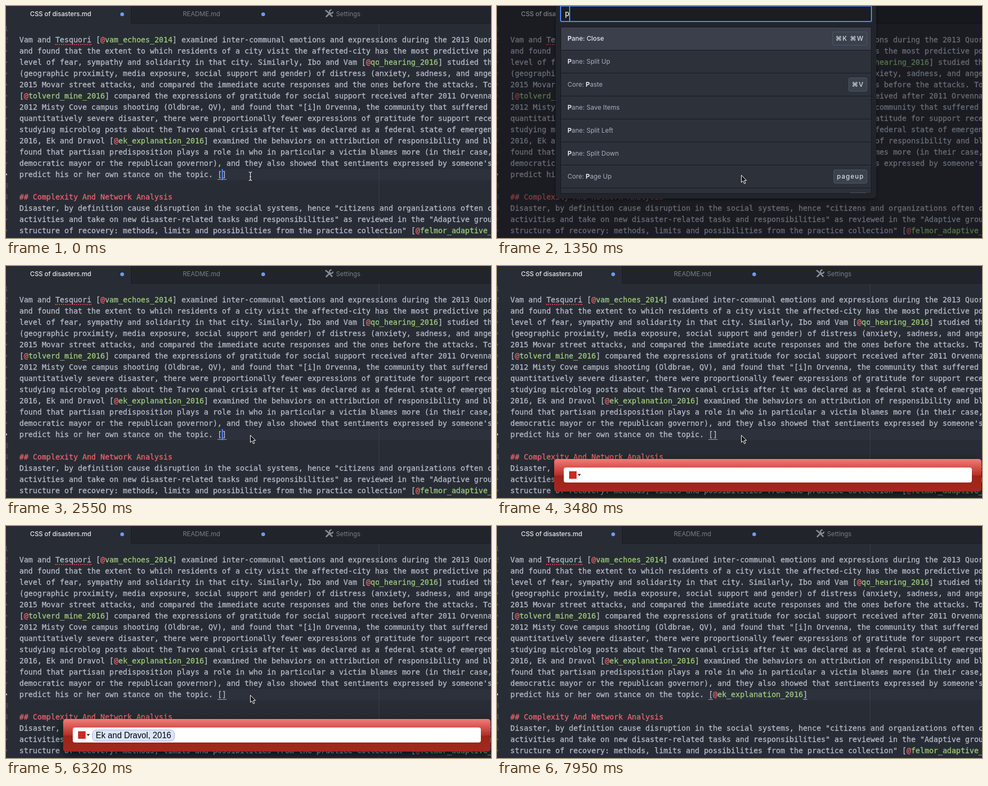
Animation, 908 px wide and 434 px high, one loop 8.1 s. Source, as an HTML page:

```html
<!DOCTYPE html>
<html lang="en">
<head>
<meta charset="utf-8">
<title>Citation picker</title>
<style>
html, body { margin: 0; width: 100%; height: 100%; overflow: hidden; background: #282c34; }
* { box-sizing: border-box; }
#stage { position: relative; width: 908px; height: 434px; overflow: hidden; background: #282c34;
  color: #b4bbc8; font: 14px/21px "DejaVu Sans Mono", monospace; }
#stage > *, .tabs > * { position: absolute; }
i { font-style: normal; }

.tabs { left: 0; top: 0; width: 908px; height: 33px; background: #21252b; border-bottom: 1px solid #181a1f;
  color: #777d88; font: 11.8px/30px Inter, sans-serif; }
.active { left: 0; top: 0; width: 235px; height: 33px; padding-left: 45px; background: #282c34;
  border-right: 1px solid #181a1f; color: #e6e8ec; font-weight: 500; }
.dot { top: 12px; width: 7px; height: 7px; border-radius: 50%; background: #6a9bfa; }

#current { left: 24px; top: 305px; width: 884px; height: 21px; background: #2c313b; }
.gutter { left: -4px; top: 32px; color: #4b5364; white-space: pre; }
.gutter b { font-weight: 400; color: #abb2bf; }
.text { left: 25px; top: 53px; white-space: pre; -webkit-text-stroke: .3px; }
.text i, .text h2 { color: #e8646e; }
.text b { font-weight: 400; color: #9ccb7b; }
.text h2 { display: inline; font: inherit; }
.text u { text-decoration: none; border-bottom: 2px dotted #d0404a; }
.text s { text-decoration: none; padding-bottom: 1px; border-bottom: 1px solid #a3aab6; }
.guide { left: 698px; top: 33px; width: 1px; height: 401px; background: #3b4048; }
#cursor { top: 305px; width: 2px; height: 21px; background: #528bff; }

#shade { inset: 0; background: #0a0b0d; }
#palette { left: 110px; top: -20px; width: 600px; padding: 19px 8px 9px; background: #21252b;
  border-radius: 6px; box-shadow: 0 2px 5px rgba(0, 0, 0, .5); }
.field { height: 31px; padding-left: 7px; border: 2px solid #4d89f5; border-radius: 3px;
  background: #1b1d23; color: #e6e8ec; line-height: 27px; white-space: pre; -webkit-text-stroke: .3px; }
#queryCaret { display: inline-block; width: 2px; height: 27px; vertical-align: top; background: #528bff; }
#list { max-height: 312px; margin: 9px 1px 0; overflow: hidden; border: 1px solid #181a1f;
  background: #2c313a; color: #a8afbd; font: 12px/42px Inter, sans-serif; }
#list div { display: flex; height: 43px; padding: 0 7px 0 12px; border-bottom: 1px solid #181a1f; white-space: pre; }
#list div:first-child { background: #3a3f4b; color: #e2e5ea; font-weight: 500; }
#list div:last-child { height: 42px; border: 0; }
#list b { font-weight: 700; color: #e2e5ea; }
#list.plain b { font-weight: inherit; color: inherit; }
#list span { flex: 1; }
kbd { height: 26px; margin: 8px 0 0 4px; padding: 0 5px; border: 1px solid #50565f; border-radius: 3px;
  background: #3c424d; color: #d7dae0; font: 500 12px/24px Inter, sans-serif; letter-spacing: 1.2px; }

#bar { left: 107px; top: 361px; width: 800px; height: 61px; border-radius: 5px;
  background: linear-gradient(#f37b77 0, #b42f26 50%, #9c241b 50%, #a4281d);
  box-shadow: 0 7px 20px rgba(0, 0, 0, .65); }
#bar > * { position: absolute; }
.entry { left: 18px; top: 16px; width: 764px; height: 28px; border-radius: 4px; background: #fff; }
.mark { left: 28px; top: 23px; width: 14px; height: 14px; background: #cc2a22; }
.arrow { left: 44px; top: 28px; border: solid transparent; border-width: 4px 3px 0; border-top-color: #333; }
.cite { left: 52px; top: 20px; height: 22px; display: flex; align-items: center; color: #000;
  font: 15.6px/20px "Liberation Sans", Arial, sans-serif; white-space: pre; }
#pill { height: 22px; margin: 0 2px; padding: 0 6px; border: 1px solid #9fb4e6; border-radius: 8px; background: #dbe4fa; }
#citeCaret { width: 1px; height: 19px; background: #000; }
#results { left: 18px; top: 46px; width: 764px; height: 60px; padding-left: 8px; background: #fff; color: #333;
  box-shadow: 0 1px 3px rgba(0, 0, 0, .5); font: bold 12px/20px "Liberation Sans", Arial, sans-serif; }
#pointer, #beam { overflow: visible; }
</style>
</head>
<body>
<div id="stage">
  <div class="tabs">
    <div class="active">CSS of disasters.md</div>
    <i class="dot" style="left:214px"></i>
    <span style="left:331px">README.md</span>
    <i class="dot" style="left:478px"></i>
    <svg style="left:597px;top:6px" width="16" height="16" fill="none" stroke="#858b96">
      <path d="M1 2L5 5L14 14" stroke-width="2.8"/>
      <path d="M2 14.5L10 6.5" stroke-width="2.8"/>
      <path d="M12.5 1.5A3.2 3.2 0 1 0 15 4.5" stroke-width="2.4"/>
    </svg>
    <span style="left:618px">Settings</span>
  </div>
  <div id="current"></div>
  <div class="gutter" id="gutter"></div>
  <div class="text" id="text"></div>
  <div class="guide"></div>
  <div id="cursor"></div>
  <div id="shade"></div>
  <div id="palette">
    <div class="field"><span id="query"></span><i id="queryCaret"></i></div>
    <div id="list"></div>
  </div>
  <div id="bar">
    <div class="entry"></div>
    <i class="mark"></i><i class="arrow"></i>
    <div class="cite"><span id="typed"></span><span id="pill">Ek and Dravol, 2016</span><i id="citeCaret"></i></div>
    <div id="results">Cited</div>
  </div>
  <svg id="pointer" width="12" height="18" style="left:457px;top:316px">
    <path d="M.5 .5V14L3.6 11.2L6 16.5L8.3 15.5L6 10.3H10.2Z" fill="#16181c" stroke="#fff"/>
  </svg>
  <svg id="beam" width="9" height="17" style="left:453px;top:310px" fill="none">
    <path d="M1.5 .5Q4.5 .5 4.5 3V14Q4.5 16.5 1.5 16.5M7.5 .5Q4.5 .5 4.5 3M4.5 14Q4.5 16.5 7.5 16.5M3 9.5H6" stroke="#e8e8e8" stroke-width="1.2"/>
  </svg>
</div>
<script>
const LOOP = 8100;
const $ = id => document.getElementById(id);
const show = (id, on) => { $(id).style.display = on ? '' : 'none'; };
const within = (t, from, to) => t >= from && t < to;

const KEY = '@ek_explanation_2016';
const prose = `Vam and <u>Tesquori</u> [@vam_echoes_2014] examined inter-communal emotions and expressions during the 2013 Quor
and found that the extent to which residents of a city visit the affected-city has the most predictive po
level of fear, sympathy and solidarity in that city. Similarly, Ibo and Vam [@qo_hearing_2016] studied th
(geographic proximity, media exposure, social support and gender) of distress (anxiety, sadness, and ange
2015 Movar street attacks, and compared the immediate acute responses and the ones before the attacks. To
[@tolverd_mine_2016] compared the expressions of gratitude for social support received after 2011 Orvenna
2012 Misty Cove campus shooting (Oldbrae, QV), and found that "[i]n Orvenna, the community that suffered
quantitatively severe disaster, there were proportionally fewer expressions of gratitude for support rece
studying microblog posts about the Tarvo canal crisis after it was declared as a federal state of emergen
2016, Ek and Dravol [${KEY}] examined the behaviors on attribution of responsibility and bl
found that partisan predisposition plays a role in who in particular a victim blames more (in their case,
democratic mayor or the republican governor), and they also showed that sentiments expressed by someone's
predict his or her own stance on the topic. <s>[</s><span id="inserted">${KEY}</span><s>]</s>

<h2>## Complexity And Network Analysis</h2>
Disaster, by definition cause disruption in the social systems, hence "citizens and organizations often c
activities and take on new disaster-related tasks and responsibilities" as reviewed in the "Adaptive grou
structure of recovery: methods, limits and possibilities from the practice collection" [@felmor_adaptive_`;
$('text').innerHTML = prose.replace(/@(\w+)/g, '<i>@</i><b>$1</b>');
$('gutter').innerHTML = ['1', '2', ...Array(11).fill('•'), '<b>•</b>', '3', '4', '5', '•', '•'].join('\n');

// Matched letters stand between asterisks, alternative shortcuts are split by a bar.
const rows = items => items.map(([name, keys]) =>
  `<div><span>${name.replace(/\*(.+?)\*/g, '<b>$1</b>')}</span>` +
  (keys ? keys.split('|').map(k => `<kbd>${k}</kbd>`).join('') : '') + '</div>').join('');

const longList = rows([
  ['*P*ane: Close', '⌘K ⌘W'],
  ['*P*ane: Split Up'],
  ['Core: *P*aste', '⌘V'],
  ['*P*ane: Save Items'],
  ['*P*ane: Split Left'],
  ['*P*ane: Split Down'],
  ['Core: *P*age Up', 'pageup'],
  ['Core: *P*rint', '⌘P']
]);
const shortList = rows([
  ['Tavuro *Pick*er: Toggle', '⌥Z'],
  ['*P*ane: Move Active *I*tem To Top Of Sta*ck*', '^⇧tab ^ctrl|^tab ^ctrl'],
  ['A*p*pl*ic*ation: Open Your *K*eymap'],
  ['*I*ncompatible Pa*ck*ages: View']
]);

let shownList;
function setList(html) {
  if (html !== shownList) $('list').innerHTML = shownList = html;
}

const typedSoFar = (t, word, times) => word.slice(0, times.filter(at => t >= at).length);

function draw(t) {
  const open = within(t, 150, 2550);
  show('current', !open);
  show('shade', open);
  show('palette', open);
  const fade = Math.min(1, Math.max(0, (t - 50) / 300));
  $('shade').style.opacity = .45 * (1 - (1 - fade) ** 3);
  $('query').textContent = typedSoFar(t, 'pick', [1050, 1500, 1650, 1800]);
  show('queryCaret', within(t, 150, 750) || within(t, 1050, 2100));
  setList(t < 1650 ? longList : shortList);
  $('list').className = t < 1200 ? 'plain' : '';

  show('bar', within(t, 2700, 6760));
  $('typed').textContent = t < 5580 ? typedSoFar(t, 'ek', [4380, 4530]) : '';
  show('pill', t >= 5580);
  show('results', within(t, 4980, 5580));
  show('citeCaret', within(t, 2880, 3480) || within(t, 4080, 5580) || within(t, 5720, 6320));

  const inserted = t >= 6910;
  show('inserted', inserted);
  show('cursor', t < 150 || within(t, 2550, 2700) || within(t, 6910, 7510));
  $('cursor').style.left = (inserted ? 572 : 404) + 'px';

  show('pointer', within(t, 150, 7210));
  show('beam', t < 150 || within(t, 7210, 7950));
  // The mouse leaves through the bottom edge in discrete steps.
  const p = Math.max(0, Math.floor((t - 7210) / 148)) / 4;
  const eased = p * p * (3 - 2 * p);
  $('beam').style.transform = `translate(${360 * eased}px, ${112 * eased}px)`;
}

const start = performance.now();
function tick() {
  draw((performance.now() - start) % LOOP);
  requestAnimationFrame(tick);
}
tick();
</script>
</body>
</html>
```
